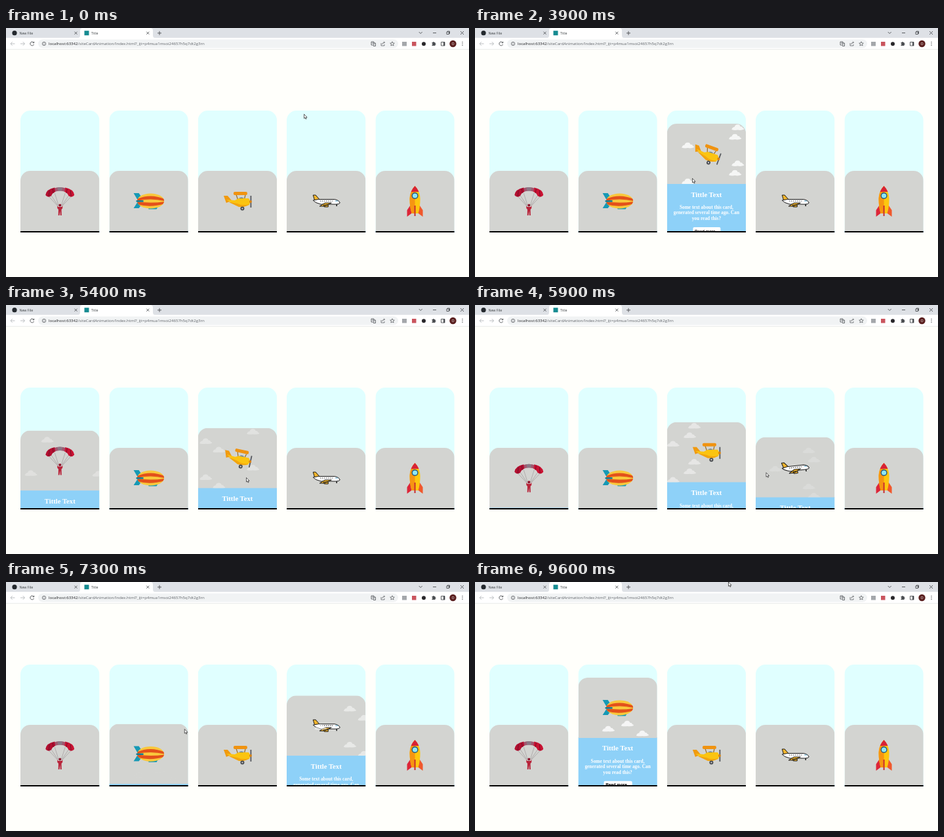
An HTML page that plays this animation: 706 px wide and 380 px high, repeating every 9700 ms.

```html
<!DOCTYPE html>
<html lang="en">
<head>
<meta charset="utf-8">
<title>Title</title>
<style>
  html, body { margin: 0; width: 100%; height: 100%; overflow: hidden; background: #fffffb; }
  svg { display: block; }
  .ui { font: 5.3px "Open Sans", sans-serif; fill: #3c4043; }
  .url { font-size: 6.1px; fill: #5f6368; }
  .line { fill: none; stroke: #4a4d51; stroke-width: .9; }
  .copy { font: bold 7.36px "Liberation Serif", serif; fill: #fff; text-anchor: middle; }
  .copy .head { font-size: 10.7px; }
  .btn { font: bold 6.15px "Liberation Sans", sans-serif; text-anchor: middle; }
</style>
</head>
<body>
<svg width="706" height="380" viewBox="0 0 706 380">
  <defs>
    <clipPath id="card"><path d="M0 186V15a15 15 0 0 1 15-15h90.5a15 15 0 0 1 15 15V186z"/></clipPath>
    <clipPath id="sky"><path d="M0 92V15a15 15 0 0 1 15-15h90.5a15 15 0 0 1 15 15V92z"/></clipPath>
    <clipPath id="hull"><ellipse cx="3" cy="0" rx="20.5" ry="11.5"/></clipPath>
    <path id="cloud" fill="#fff" d="M-9.5 3.5Q-8-.5-5-.5Q-4-4.5 0-4.2Q3-4.4 4-1.2Q7-1.5 7.5 1Q9.5 1.3 9.8 3Q5 5 0 4Q-5 5-9.5 3.5z"/>

    <g id="parachute">
      <path d="M-19-9L-4 7M-13-8L-3 7M-8-12L-2 7M19-9L4 7M13-8L3 7M8-12L2 7" stroke="#8c8385" stroke-width=".5" fill="none"/>
      <path d="M-10-19Q0-23 10-19L8-14Q0-17-8-14z" fill="#a3566e"/>
      <path d="M-4-20.5Q0-21.5 4-20.5L3-15.5H-3z" fill="#8b7785"/>
      <path d="M-22-9Q-21-18-8-20.5L-7-14Q-12-12-13-8Q-18-4-22-9z" fill="#b30f30"/>
      <path d="M22-9Q21-18 8-20.5L7-14Q12-12 13-8Q18-4 22-9z" fill="#c91232"/>
      <path d="M-16-16L-17-7M16-16L17-7M-11-19L-10-12M11-19L10-12" stroke="#780c27" stroke-width="1"/>
      <circle cy="6.5" r="2" fill="#8e142c"/>
      <path d="M-4 7L-2.5 9H2.5L4 7V11L2.3 13 2.5 22H.7L0 15-.7 22H-2.5L-2.3 13-4 11z" fill="#b8243a"/>
    </g>

    <g id="airship">
      <path d="M-23-12H-15L-9-3-16 0zM-23 11H-15L-9 3-16 0zM-1 9H14L12 12.5H0z" fill="#1699b5"/>
      <g clip-path="url(#hull)">
        <path d="M-18-12H24V12H-18z" fill="#f9c83c"/>
        <path d="M-18-3Q3-12 24-3V0Q3-5-18 0zM-18 1Q3 4 24 1V4Q3 11-18 5z" fill="#e3511b"/>
      </g>
      <path d="M-19-1H-8V1.5H-19z" fill="#0c7e9a"/>
    </g>

    <g id="biplane">
      <path d="M-2-10L1-1M12-9L10 0M4 4L8 11" stroke="#9a6d20" stroke-width="1.2"/>
      <path d="M-21-8H-15L-9-1-17 3z" fill="#f09a10"/>
      <path d="M-17-2L-4-1 2-4H17Q21 0 18 6Q8 11-2 7z" fill="#fbc411"/>
      <path d="M-15 1L0 4Q8 8 18 5Q12 10 2 9L-2 7z" fill="#f2a50f"/>
      <rect x="-6" y="-14" width="21" height="5" rx="2" fill="#f09310"/>
      <path d="M2-4Q6-7 10-4z" fill="#5a7894"/>
      <path d="M20.5-8V10" stroke="#55585e" stroke-width="1.8"/>
      <circle cx="20" cy="1" r="2" fill="#dc8411"/>
      <circle cx="7.5" cy="11.5" r="3" fill="#4a4d52"/><circle cx="7.5" cy="11.5" r="1.1" fill="#ddd"/>
    </g>

    <g id="airliner" stroke="#191919" stroke-width="1" stroke-linejoin="round">
      <path d="M-20-9H-16L-10-2-17 1z" fill="#f2b52d"/>
      <path d="M-20-1L-12-2.5H13Q20-1 21 3Q20 5 15 5H-8Q-17 3-20-1z" fill="#fff"/>
      <path d="M-2 3H8L-3 8H-10zM-4 6H3V9H-3z" fill="#f2b52d"/>
      <path d="M-9 0H11" stroke-dasharray="1.2 1.7" stroke-width="1.2"/>
      <path d="M14 0H18" stroke="#4a9cc4"/>
      <path d="M16 5V8" stroke-width="1.5"/>
    </g>

    <g id="rocket">
      <path d="M-6 5L-12 14V24L-4 18z" fill="#dd2638"/><path d="M6 5L12 14V24L4 18z" fill="#f0582c"/>
      <path d="M0-23Q-8-14-8-3Q-8 9-5 19H5Q8 9 8-3Q8-14 0-23z" fill="#fdc60f"/>
      <path d="M0-23Q-8-14-8-3Q-8 9-5 19H0z" fill="#f69512"/>
      <path d="M0-23Q-4-19-6-14H6Q4-19 0-23z" fill="#d82235"/>
      <circle cy="-8" r="5" fill="#25577a"/><circle cy="-8" r="3.6" fill="#8ee7f5"/>
      <path d="M-1 7H1V23H-1z" fill="#c92b30"/>
    </g>
  </defs>

  <!-- browser bar -->
  <rect width="706" height="15" fill="#dee1e6"/>
  <path d="M110 15Q113 15 113 11V4Q113 0 117 0H220Q224 0 224 4V11Q224 15 227 15H706V33H0V15z" fill="#fff"/>
  <path d="M0 32.6H706" stroke="#e3e4e5" stroke-width=".8"/>
  <rect x="49" y="17.5" width="549" height="13" rx="6.5" fill="#f1f3f4"/>
  <circle cx="13" cy="7.7" r="3.6" fill="#24292e"/>
  <rect x="119.5" y="4.2" width="7" height="7" fill="#168b91"/>
  <g class="ui">
    <text x="20.5" y="9.7">New File</text>
    <text x="130" y="9.7">Title</text>
    <text class="url" x="65" y="26.3"><tspan fill="#202124">localhost:63342</tspan>/siteCardAnimation/Index.html?_ijt=p4mua1msoi24657h5q7dt2g3rn</text>
  </g>
  <g class="line">
    <path d="M104.5 5.7l4 4m0-4l-4 4M214.3 5.7l4 4m0-4l-4 4M231 7.8h6m-3-3v6M629.7 6l2.5 2.5L634.7 6M651 7.5h5M693 5l5 5m0-5l-5 5"/>
    <path d="M672 6h3.5v3.5H672zM673 6V5h3.5v3.500h-1"/>
    <path d="M13.500 24h-6.500m2.700-2.800L7 24l2.700 2.800M22 24h6.500m-2.700-2.800l2.700 2.800-2.700 2.800" stroke="#b5b8bc"/>
    <path d="M42.300 22.500a2.900 2.900 0 1 0 .2 2.500M42.700 20.800v2h-2"/>
    <circle cx="58" cy="24" r="2.700" stroke-width=".7"/><path d="M58 23.600v2m0-3.400v.7" stroke-width=".7"/>
    <path d="M557 21h4v5h-4zM560 23h3.500v4.500H560M558 23h2" stroke-width=".8"/>
    <path d="M572 23v4h5v-2M573.500 25q.5-3 4-3m-1.500-1.500l1.500 1.500-1.500 1.500" stroke-width=".7"/>
    <path d="M589 20.800l1 2.200 2.300.2-1.800 1.500.6 2.300-2.100-1.200-2.100 1.200.6-2.300-1.800-1.500 2.300-.2z" stroke-width=".7"/>
    <path d="M663.500 21.500h5.500v5.500h-5.500z"/>
  </g>
  <path d="M667 21.500h2V27h-2zM649.500 22h1.500a1 1 0 0 1 2 0h1.500v1.500a1 1 0 0 1 0 2V27h-5v-1.500a1 1 0 0 0 0-2z" fill="#4a4d51"/>
  <rect x="604" y="21" width="7" height="6.500" fill="#a4a7ab"/>
  <rect x="619" y="21" width="6.500" height="6.500" fill="#c9545e"/>
  <circle cx="637" cy="24.300" r="3" fill="#29272b"/>
  <circle cx="681.500" cy="24" r="5.200" fill="#5b2020"/>
  <text x="681.500" y="26" class="ui" style="fill:#fff;text-anchor:middle">O</text>
  <path d="M696 21.500v.1m0 2.300v.1m0 2.300v.1" stroke="#4a4d51" stroke-width="1.300" stroke-linecap="round"/>

  <g id="cards"></g>
  <g id="pointer">
    <path id="arrow" d="M0 0V6.500L1.500 5.200 2.500 7.500 3.600 7 2.600 4.800H4.600z" fill="#fff" stroke="#222" stroke-width=".7"/>
    <path id="beam" d="M-1.500 0Q0 0 0 1Q0 0 1.500 0M0 1V6M-1.500 7Q0 7 0 6Q0 7 1.500 7" fill="none" stroke="#222" stroke-width=".8"/>
  </g>
</svg>
<script>
const LOOP = 9700, STEP = 100, RISE = 92, WIDTH = 120.5;
const $ = id => document.getElementById(id);
const mod = (a, n) => ((a % n) + n) % n;
const swing = t => Math.sin(Math.PI * t);
const lift = t => (1 - Math.cos(t * Math.PI / 1.2)) / 2;

// Clouds that stream left, wrapping at the card edge; every row repeats 55px lower.
const stream = (rows, at) => t => rows.flatMap(([x, y, v]) => {
  const cx = mod(x - v * (t - at), 120);
  return [[cx, y], [cx, y + 55]];
});

// Each card: picture, hover spans in ms, pose and clouds after t seconds of hover.
const cards = [
  { art: 'parachute', spans: [[4230, 5000]],
    pose: t => `rotate(${10 * swing(t)})`,
    clouds: t => [[41, 14], [16, 65], [119, 66]].map(([x, y]) => [x, mod(y + 8 - 70 * t, 108) - 8]) },
  { art: 'airship', spans: [[7270, 9435]],
    pose: t => `translate(0 ${-20 * lift(t)})`,
    clouds: t => [[46, 78, -32, 12], [75, 70, 44, 20], [98, 85, 25, 25]]
      .map(([x, y, dx, dy]) => [x + dx * lift(t), y + dy * lift(t)]) },
  { art: 'biplane', spans: [[3420, 4010], [5185, 5680]],
    pose: t => `rotate(${20 * swing(t)})`,
    clouds: stream([[84, 5.5, 362], [12, 20, 106], [32, 33, 453]], .215) },
  { art: 'airliner', spans: [[5755, 7000]],
    pose: t => `rotate(${-15 * swing(t)})`,
    clouds: stream([[28, 20, 106], [109, 34, 200], [75, -7, 150]], .645) },
  { art: 'rocket', spans: [], pose: () => '', clouds: () => [] }
];

$('cards').innerHTML = cards.map((c, i) => `
  <g transform="translate(${22 + i * 135.33} 126)">
    <g clip-path="url(#card)">
      <rect width="${WIDTH}" height="186" fill="#e0ffff"/>
      <g class="sheet">
        <rect y="91" width="${WIDTH}" height="100" fill="#8ed1f8"/>
        <g clip-path="url(#sky)">
          <rect width="${WIDTH}" height="92" fill="#d3d4d1"/>
          <g transform="translate(60.25 46)"><use class="art" href="#${c.art}"/></g>
          <g class="clouds">${'<use href="#cloud"/>'.repeat(c.clouds(0).length)}</g>
        </g>
        <g class="copy">
          <text class="head" x="60.25" y="111.5">Tittle Text</text>
          <text x="60.25" y="130">Some text about this card,</text>
          <text x="60.25" y="138.400">generated several time ago. Can</text>
          <text x="60.25" y="146.800">you read this?</text>
        </g>
        <g class="btn"><rect x="-21" y="-6" width="42" height="12" rx="2" fill="#fff"/><text y="2.200">Read more...</text></g>
      </g>
      <rect y="184" width="${WIDTH}" height="2.500" fill="#000"/>
    </g>
  </g>`).join('');

cards.forEach((c, i) => {
  const root = $('cards').children[i], get = s => root.querySelector(s);
  Object.assign(c, { sheet: get('.sheet'), artEl: get('.art'), cloudBox: get('.clouds'), btn: get('.btn') });
});

// CSS "ease": cubic-bezier(.25, .1, .25, 1)
function ease(x) {
  if (x <= 0) return 0;
  if (x >= 1) return 1;
  let lo = 0, hi = 1, s;
  for (let i = 0; i < 20; i++) {
    s = (lo + hi) / 2;
    const bx = .75 * s * (1 - s) + s ** 3;
    if (bx < x) lo = s; else hi = s;
  }
  return .3 * s * (1 - s) ** 2 + 3 * s * s * (1 - s) + s ** 3;
}

// Hover transition; leaving early shortens the way back.
function progress(spans, t, length) {
  const span = spans.filter(s => s[0] <= t).pop();
  if (!span) return 0;
  const [from, to] = span;
  if (t < to) return ease((t - from) / length);
  const top = ease((to - from) / length);
  return top * (1 - ease((t - to) / (length * top)));
}

const path = [
  [0, 454.5, 131.5], [2900, 454.5, 131.5], [3420, 345, 218], [3900, 331.5, 229.5], [4010, 293, 200],
  [4110, 220, 195], [4230, 143, 225], [4500, 90, 240], [4800, 95, 225], [5000, 143, 195],
  [5090, 220, 185], [5185, 293, 225], [5400, 366.5, 263.5], [5680, 413, 262], [5755, 428, 260],
  [6100, 466, 250], [6400, 468, 243.5], [6800, 470, 235], [7000, 428, 195], [7130, 350, 190],
  [7270, 277, 222], [7600, 225, 250], [8000, 219.5, 290], [8400, 219.5, 300.5], [8900, 219.5, 300.5],
  [9050, 222, 288], [9340, 232, 286], [9600, 386.5, 0]
];

function pointerAt(t) {
  const i = path.findIndex(k => k[0] > t);
  if (i < 0) return path[path.length - 1].slice(1);
  const [a, x, y] = path[i - 1], [b, u, v] = path[i], k = (t - a) / (b - a);
  return [x + (u - x) * k, y + (v - y) * k];
}

function draw(t) {
  cards.forEach((c, i) => {
    const p = progress(c.spans, t, 1000);
    const live = c.spans.find(s => t >= s[0] && t < s[1]);
    const hover = live ? (t - live[0]) / 1000 : 0;
    c.sheet.setAttribute('transform', `translate(0 ${RISE * (1 - p)})`);
    c.artEl.setAttribute('transform', c.pose(hover));
    c.cloudBox.setAttribute('opacity', p);
    c.clouds(hover).forEach(([x, y], n) =>
      c.cloudBox.children[n].setAttribute('transform', `translate(${x} ${y})`));
    const grow = i === 1 ? 1 + .16 * progress([[9050, 9370]], t, 500) : 1;
    c.btn.setAttribute('transform', `translate(60.75 164) scale(${grow})`);
  });
  const beam = t >= 6200 && t < 6900;
  $('arrow').style.display = beam ? 'none' : '';
  $('beam').style.display = beam ? '' : 'none';
  $('pointer').setAttribute('transform', `translate(${pointerAt(t)})`);
}

function tick() {
  draw(Math.floor(performance.now() % LOOP / STEP) * STEP);
  requestAnimationFrame(tick);
}
tick();
</script>
</body>
</html>
```
